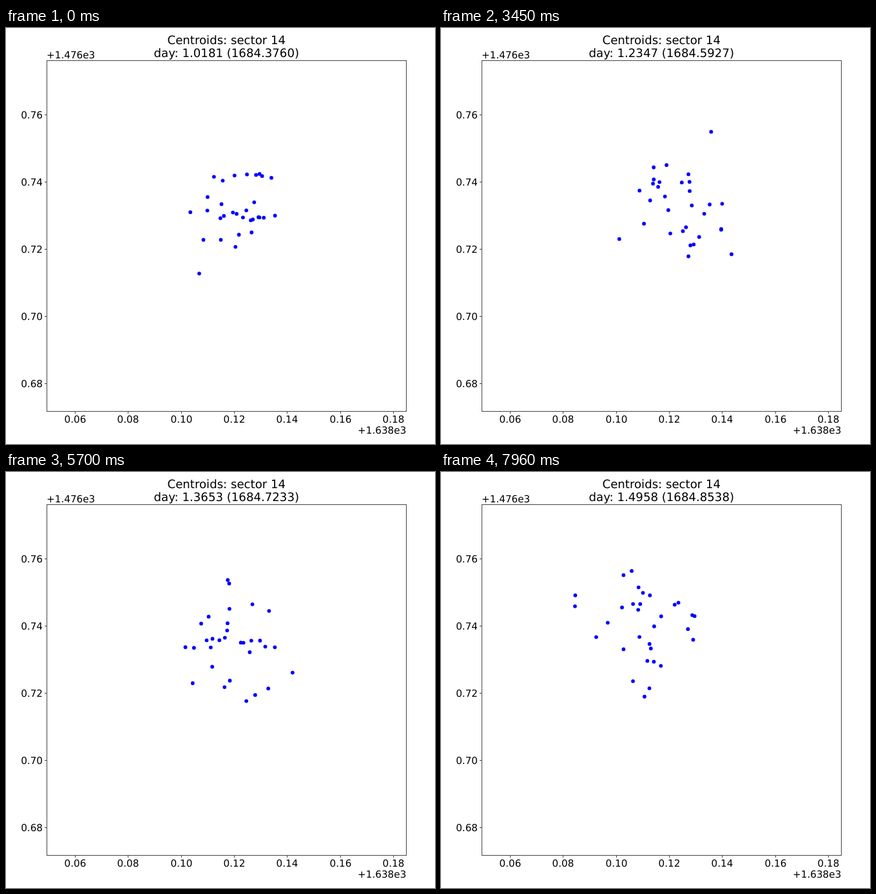
Recreate the animation shown at these times as an HTML page. Size 666 by 644 pixels, loop 8000 ms.

```html
<!DOCTYPE html>
<html lang="en">
<head>
<meta charset="utf-8">
<title>Centroids</title>
<style>
  html, body { margin: 0; width: 100%; height: 100%; overflow: hidden; background: #fff; }
  svg { display: block; width: 666px; height: 644px; font: 15.2px "DejaVu Sans", sans-serif; text-rendering: geometricPrecision; }
  .title { font-size: 18.15px; }
  .line { fill: none; stroke: #444; stroke-width: 1; }
  .dot { fill: #00f; }
</style>
</head>
<body>
<svg id="plot" viewBox="0 0 666 644"></svg>
<script>
const LOOP = 8000;
const STARTS = [0, 500, 1200, 1980, 2760, 3450, 4220, 4920, 5700, 6480, 7180, 7960];
const DOT_COUNT = 31;

// The cloud's centre drifts through these points
const DRIFT = [
  { step: 0, x: 358, y: 276 },
  { step: 3, x: 335, y: 270 },
  { step: 5, x: 368, y: 273 },
  { step: 11, x: 318, y: 250 }
];

const plot = document.getElementById("plot");

function add(tag, attrs, text = "") {
  const node = document.createElementNS("http://www.w3.org/2000/svg", tag);
  for (const key in attrs) node.setAttribute(key, attrs[key]);
  node.textContent = text;
  return plot.appendChild(node);
}

function label(x, y, anchor, text, cls = "") {
  return add("text", { x, y, "text-anchor": anchor, class: cls }, text);
}

function seeded(seed) {
  let state = seed * 7919 + 17;
  const next = () => (state = (state * 16807) % 2147483647) / 2147483647;
  for (let i = 0; i < 10; i++) next();
  return next;
}

function centreAt(step) {
  const i = Math.max(1, DRIFT.findIndex(point => point.step >= step));
  const from = DRIFT[i - 1], to = DRIFT[i];
  const part = (step - from.step) / (to.step - from.step);
  return {
    x: from.x + (to.x - from.x) * part,
    y: from.y + (to.y - from.y) * part
  };
}

function makeCloud(step) {
  const random = seeded(step + 1);
  const bell = () => (random() + random() + random() + random() - 2) * Math.sqrt(3);
  const centre = centreAt(step);
  const spread = 38 + step;
  return Array.from({ length: DOT_COUNT }, () => ({
    x: centre.x + bell() * spread,
    y: centre.y + bell() * spread
  }));
}

const clouds = STARTS.map((start, step) => makeCloud(step));

add("rect", { x: 63.5, y: 50.5, width: 558, height: 543, class: "line" });
for (let i = 0; i < 7; i++) {
  const x = Math.floor(107.5 + i * 82.33) + 0.5;
  add("path", { d: `M${x} 593.5v3.5`, class: "line" });
  label(x, 611, "middle", (0.06 + i * 0.02).toFixed(2));
}
for (let i = 0; i < 5; i++) {
  const y = 134.5 + i * 104;
  add("path", { d: `M63.5 ${y}h-3.5`, class: "line" });
  label(57, y + 5.5, "end", (0.76 - i * 0.02).toFixed(2));
}
label(63, 47, "start", "+1.476e3");
label(621.3, 628, "end", "+1.638e3");
label(342.3, 25, "middle", "Centroids: sector 14", "title");
const dayLabel = label(342.3, 45, "middle", "", "title");
const dots = Array.from({ length: DOT_COUNT }, () => add("circle", { r: 2.9, class: "dot" }));

let shown = -1;

function render(time) {
  const step = STARTS.findLastIndex(start => start <= time % LOOP);
  if (step === shown) return;
  shown = step;
  // Samples come 720 to the day
  const day = Math.floor(733 + 31.3 * step) / 720;
  dayLabel.textContent = `day: ${day.toFixed(4)} (${(day + 1683.35799).toFixed(4)})`;
  dots.forEach((dot, i) => {
    dot.setAttribute("cx", clouds[step][i].x);
    dot.setAttribute("cy", clouds[step][i].y);
  });
}

const origin = performance.now();
function tick() {
  render(performance.now() - origin);
  requestAnimationFrame(tick);
}
tick();
</script>
</body>
</html>
```
